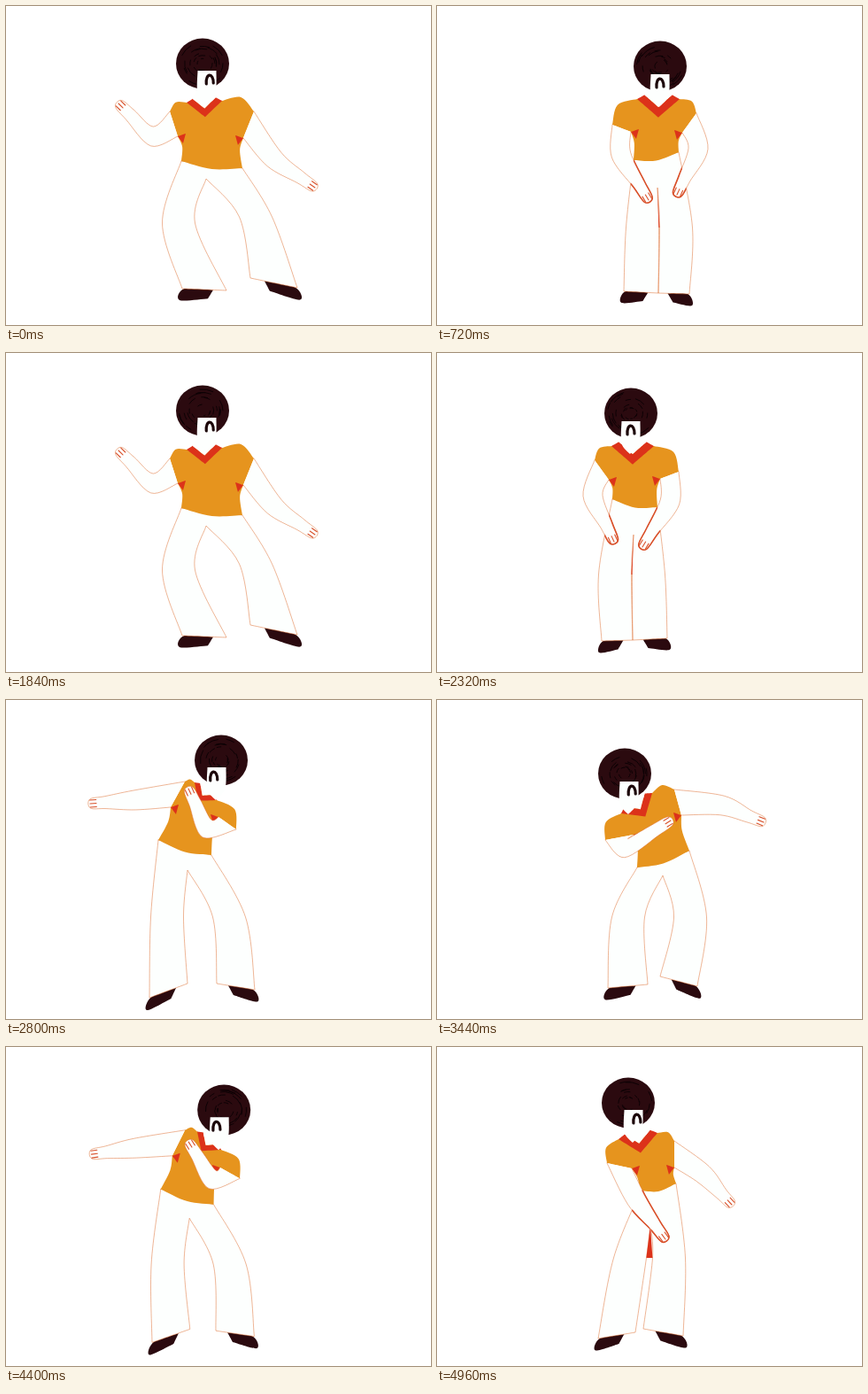
Write an HTML page with a canvas that moves like this. It is 480 px wide and 360 px high and loops after 5.04 s.

```html
<!DOCTYPE html>
<html lang="en">
<head>
<meta charset="utf-8">
<title>Disco dancer</title>
<style>
  html, body { margin: 0; width: 100%; height: 100%; overflow: hidden; background: #fff; }
  canvas { display: block; }
</style>
</head>
<body>
<canvas id="stage" width="480" height="360"></canvas>
<script>
const ctx = document.getElementById('stage').getContext('2d');
const LOOP = 5040, STEP = 80, AXIS = 471;
const DARK = '#2b0a0f', SHIRT = '#e6941e', RED = '#dc321a', SKIN = '#fdfffe', LINE = '#dd6a2c';

// Joints of the puppet; sleeve and pit are the two ends of a cuff, toe and heel those of a hem
const JOINTS = ('head face crotch neckL neckR sleeveL sleeveR pitL pitR elbowL elbowR ' +
  'handL handR waistL waistR kneeL kneeR toeL toeR heelL heelR').split(' ');

const pose = (...n) =>
  Object.fromEntries(JOINTS.map((name, i) => [name, [n[2 * i], n[2 * i + 1]]]));

const wind = pose(
  222,65, 227,73, 226,195, 204,109, 244,107, 185,119, 280,119, 194,147, 268,149,
  165,147, 303,173, 127,110, 349,205, 198,175, 267,183,
  195,245, 282,238, 199,319, 329,318, 249,321, 276,307);
const low = pose(
  252,68, 252,77, 249,205, 226,105, 274,105, 198,134, 293,121, 219,142, 277,143,
  208,168, 295,161, 239,219, 271,213, 222,174, 273,165,
  232,250, 270,250, 211,322, 285,325, 250,324, 250,324);
const swing = pose(
  216,63, 222,71, 241,201, 205,104, 249,97, 192,131, 268,106, 220,137, 268,136,
  225,172, 300,143, 258,217, 333,178, 230,162, 270,154,
  218,238, 262,238, 182,329, 278,326, 224,322, 233,318);
const dab = pose(
  243,68, 238,76, 205,192, 213,93, 238,113, 202,92, 260,146, 186,121, 240,132,
  145,113, 227,145, 95,117, 206,100, 172,158, 232,175,
  182,245, 252,245, 162,336, 281,327, 205,320, 238,320);
const dabIn = pose(
  212,83, 217,92, 255,198, 208,128, 243,105, 190,158, 268,101, 222,152, 276,130,
  214,167, 322,119, 264,136, 369,138, 226,189, 285,170,
  216,245, 286,245, 193,325, 294,323, 238,321, 252,312);
const stand = pose(
  257,71, 257,82, 256,193, 241,110, 275,107, 221,136, 294,135, 241,145, 272,143,
  229,180, 285,180, 240,231, 298,223, 239,170, 274,169,
  225,245, 290,245, 205,325, 322,330, 248,320, 279,326);

const mapPose = (p, fn) => Object.fromEntries(Object.entries(p).map(fn));
const flipName = k => k.replace(/[LR]$/, s => s === 'L' ? 'R' : 'L');
const mirror = p => mapPose(p, ([k, [x, y]]) => [flipName(k), [AXIS - x, y]]);

// The wound-up pose stretched upwards with one arm thrown out
const reach = mapPose(wind, ([k, [x, y]]) =>
  [k, [x, y - 18 * Math.min(1, Math.max(0, (310 - y) / 120))]]);
reach.elbowR = [325, 117];
reach.handR = [374, 120];

const [windM, lowM, swingM, dabM, dabInM, standM, reachM] =
  [wind, low, swing, dab, dabIn, stand, reach].map(mirror);

const KEYS = [
  [0, wind], [160, reach], [400, lowM], [480, lowM], [720, low], [800, swingM],
  [880, windM], [1060, reachM], [1360, low], [1440, low], [1680, lowM], [1760, swing],
  [1840, wind], [1920, wind], [2060, reach], [2320, lowM], [2640, dabInM], [2800, dab],
  [3120, standM], [3440, dabIn], [3600, dabM], [3920, stand], [4300, dabInM], [4440, dab],
  [4780, standM], [4960, swing], [LOOP, wind]
];

const mix = (a, b, u) => [a[0] + (b[0] - a[0]) * u, a[1] + (b[1] - a[1]) * u];
const move = (p, d, s = 1) => [p[0] + d[0] * s, p[1] + d[1] * s];
const unit = (a, b) => {
  const d = Math.hypot(b[0] - a[0], b[1] - a[1]) || 1;
  return [(b[0] - a[0]) / d, (b[1] - a[1]) / d];
};

function poseAt(t) {
  const i = KEYS.findIndex(k => k[0] > t);
  const [t0, a] = KEYS[i - 1], [t1, b] = KEYS[i];
  const u = (t - t0) / (t1 - t0), e = u * u * (3 - 2 * u);
  return mapPose(a, ([k, pt]) => [k, mix(pt, b[k], e)]);
}

// Curve through the points: c marks a corner, s a smooth point
function outline(pts, kind, open) {
  const path = new Path2D(), n = pts.length, at = i => pts[(i + n) % n];
  path.moveTo(...pts[0]);
  for (let i = 0; i < n - (open ? 1 : 0); i++) {
    const p = at(i), q = at(i + 1);
    const before = kind[i] === 'c' ? p : at(i - 1);
    const after = kind[(i + 1) % n] === 'c' ? q : at(i + 2);
    path.bezierCurveTo(
      p[0] + (q[0] - before[0]) / 6, p[1] + (q[1] - before[1]) / 6,
      q[0] - (after[0] - p[0]) / 6, q[1] - (after[1] - p[1]) / 6, ...q);
  }
  return path;
}

function fill(path, color) {
  ctx.fillStyle = color;
  ctx.fill(path);
}

function stroke(path, color, width) {
  ctx.strokeStyle = color;
  ctx.lineWidth = width;
  ctx.stroke(path);
}

const patch = (color, ...pts) => fill(outline(pts, 'c'.repeat(pts.length)), color);

function drawShoe(toe, heel) {
  const d = unit(heel, toe), ankle = mix(heel, toe, 0.3);
  const tip = move(move(toe, d, 3), [0, 13]);
  const sole = move(move(ankle, d, 6), [0, 10]);
  fill(outline([ankle, mix(heel, toe, 0.95), tip, sole], 'cssc'), DARK);
}

function drawPants(p) {
  const side = (knee, s) => move(knee, [18.5 * s, 0]);
  const inL = side(p.kneeL, 1), inR = side(p.kneeR, -1);
  const path = outline([
    p.waistL, side(p.kneeL, -1), p.toeL, p.heelL, inL, p.crotch,
    inR, p.heelR, p.toeR, side(p.kneeR, 1), p.waistR], 'csccscsccsc');
  fill(path, SKIN);
  stroke(path, LINE, 0.5);
  if (Math.abs(inR[0] - inL[0]) < 10) patch(RED, p.crotch, inL, inR);
  return path;
}

function drawShirt(p) {
  const middle = mix(p.waistL, p.waistR, 0.5);
  const half = (s, turn) => {
    const neck = p['neck' + s], sleeve = p['sleeve' + s], pit = p['pit' + s], waist = p['waist' + s];
    const bulge = [(sleeve[1] - neck[1]) * turn, (neck[0] - sleeve[0]) * turn];
    const flank = mix(mix(pit, waist, 0.35), middle, 0.1);
    return [neck, move(mix(neck, sleeve, 0.5), bulge, 0.28), sleeve, pit, flank, waist];
  };
  const left = half('L', -1), right = half('R', 1);
  fill(outline([...left, move(middle, [0, 5]), ...right.reverse()], 'csccscscsccsc'), SHIRT);
  for (const s of ['L', 'R']) {
    const pit = p['pit' + s], inward = unit(pit, [middle[0], pit[1]]);
    patch(RED, pit, move(move(pit, inward, 9), [0, -3]), move(move(pit, inward, 6), [0, 8]));
  }
}

function drawCollar({ neckL, neckR, face }) {
  const down = [neckL[1] - neckR[1], neckR[0] - neckL[0]];
  const tip = move(mix(neckL, neckR, 0.5), down, 0.43);
  const inner = move(tip, down, -0.24);
  const top = neck => move(mix(neck, tip, 0.35), down, -0.25);
  patch(RED, neckL, top(neckL), inner, top(neckR), neckR, tip);
  patch(SKIN, top(neckL), inner, top(neckR), face);
}

function drawHair([x, y], frame) {
  const hair = new Path2D();
  hair.ellipse(x, y, 30, 28.5, 0, 0, 7);
  fill(hair, DARK);
  let seed = frame * 97 + 13;
  const rnd = () => (seed = (seed * 16807 + 11) % 2147483647) / 2147483647;
  for (let i = 0; i < 30; i++) {
    const r = 6 + rnd() * 21, a = rnd() * 6.28, curl = new Path2D();
    curl.ellipse(x, y, r, r * 0.93, 0, a, a + 0.25 + rnd() * 0.5);
    stroke(curl, '#0c0104', 1);
  }
}

function drawFace(head, face) {
  const at = (x, y) => move(face, [x, y]);
  fill(outline([at(-10.5, 0), at(-10.5, 25), at(-1, 37), at(9.5, 24), at(10.5, 0)], 'cscsc'), SKIN);
  const [x, y] = at((face[0] - head[0]) * 0.65, 9);
  const eye = new Path2D();
  eye.moveTo(x - 4, y + 6);
  eye.bezierCurveTo(x - 5, y - 7, x + 4, y - 7, x + 4, y + 5);
  stroke(eye, '#1c0508', 3.2);
}

function drawArm(p, s, pants) {
  const turn = s === 'L' ? 1 : -1;
  const sleeve = p['sleeve' + s], pit = p['pit' + s], elbow = p['elbow' + s], hand = p['hand' + s];
  const upper = unit(mix(sleeve, pit, 0.5), elbow), fore = unit(elbow, hand);
  const wrist = mix(elbow, hand, 0.65);
  const normal = d => [-d[1] * turn, d[0] * turn];
  const nElbow = normal(unit([0, 0], move(upper, fore))), n = normal(fore);
  const edge = outline([
    sleeve, move(elbow, nElbow, 11), move(wrist, n, 7), move(hand, n, 5),
    move(hand, n, -5), move(wrist, n, -7), move(elbow, nElbow, -11), pit], 'cssssssc', true);
  fill(edge, SKIN);
  stroke(edge, LINE, 0.5);
  // The line is bolder in front of the trousers
  ctx.save();
  ctx.clip(pants);
  stroke(edge, '#d9502a', 1.6);
  ctx.restore();
  const fingers = new Path2D();
  for (const off of [-4, 0, 4]) {
    const tip = move(hand, n, off);
    fingers.moveTo(...tip);
    fingers.lineTo(...move(tip, fore, -7));
  }
  stroke(fingers, '#d9502a', 1.1);
}

function draw(t) {
  const p = poseAt(t);
  ctx.fillStyle = '#fff';
  ctx.fillRect(0, 0, 480, 360);
  drawShoe(p.toeL, p.heelL);
  drawShoe(p.toeR, p.heelR);
  const pants = drawPants(p);
  drawShirt(p);
  drawCollar(p);
  drawHair(p.head, t / STEP);
  drawFace(p.head, p.face);
  drawArm(p, 'L', pants);
  drawArm(p, 'R', pants);
}

ctx.lineCap = ctx.lineJoin = 'round';
const start = performance.now();
function tick() {
  const t = Math.max(0, performance.now() - start) % LOOP;
  draw(Math.floor(t / STEP) * STEP);
  requestAnimationFrame(tick);
}
tick();
</script>
</body>
</html>
```
